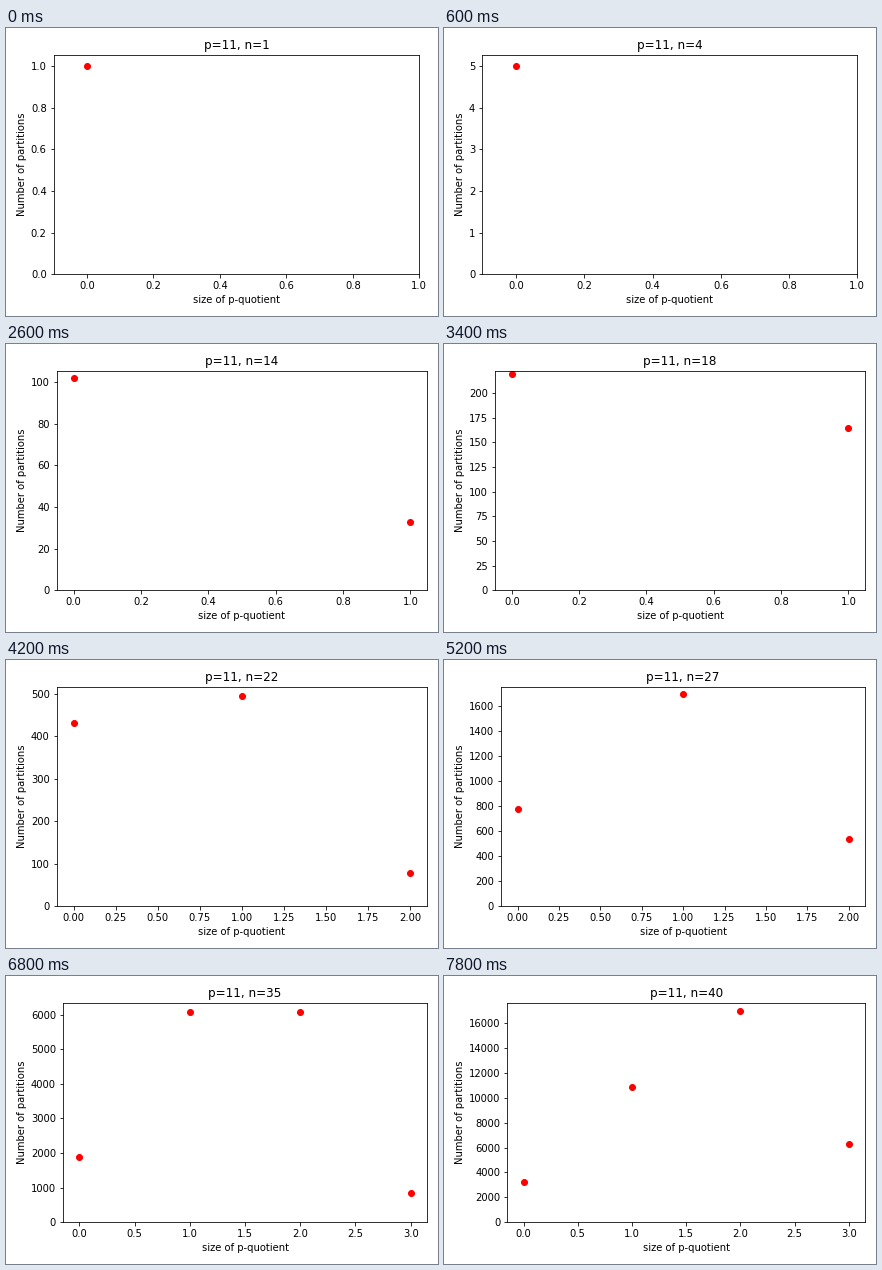
A matplotlib script that plays this animation: 432x288 px, repeating every 8 s.

```python
import matplotlib.pyplot as plt
from matplotlib.animation import FuncAnimation

P = 11
N_MAX = 40


def times_partitions(series, power=1):
    """Multiply a power series by prod 1 / (1 - x^k)^power."""
    out = list(series)
    for k in range(1, len(out)):
        for _ in range(power):
            for i in range(k, len(out)):
                out[i] += out[i - k]
    return out


def core_counts(p, size):
    """Number of p-cores of each size: prod (1 - x^(pk))^p / (1 - x^k)."""
    out = times_partitions([1] + [0] * size)
    for k in range(p, size + 1, p):
        for _ in range(p):
            for i in range(size, k - 1, -1):
                out[i] -= out[i - k]
    return out


cores = core_counts(P, N_MAX)
quotients = times_partitions([1] + [0] * (N_MAX // P), P)

fig = plt.figure(figsize=(6, 4), dpi=72, facecolor="white")


def update(frame):
    n = frame + 1
    weights = list(range(n // P + 1))
    counts = [cores[n - P * w] * quotients[w] for w in weights]

    fig.clear()
    fig.subplots_adjust(left=0.125, right=0.9, bottom=0.11, top=0.88)
    ax = fig.add_subplot()
    ax.plot(weights, counts, "ro")
    if len(weights) == 1:
        ax.set_xlim(-0.1, 1)
    ax.set_ylim(bottom=0)
    ax.set_title(f"p={P}, n={n}")
    ax.set_xlabel("size of p-quotient")
    ax.set_ylabel("Number of partitions")
    fig.tight_layout()
    return [ax]


anim = FuncAnimation(fig, update, frames=N_MAX, interval=200,
                     repeat=True, repeat_delay=0)
plt.show()
```
